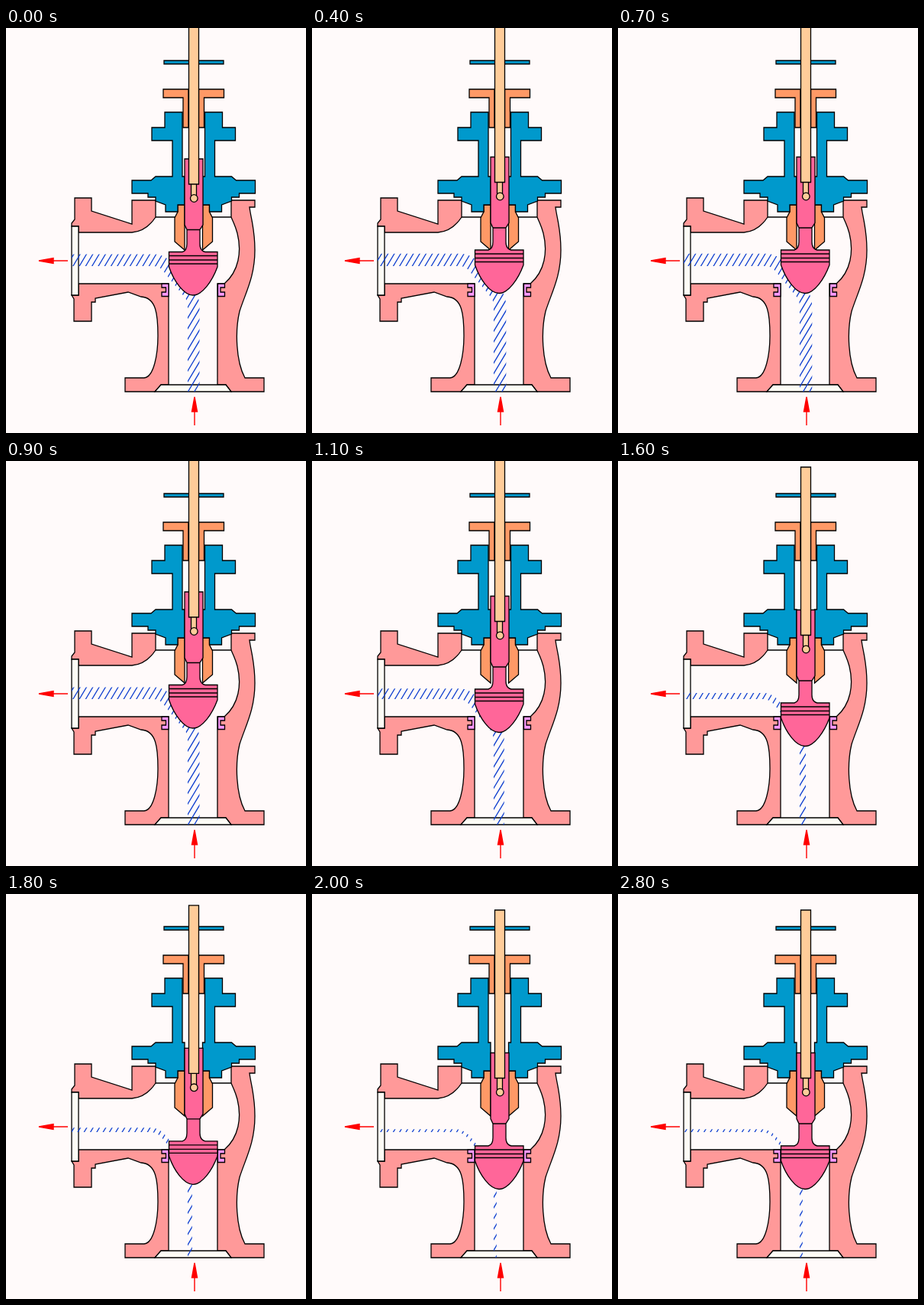
Animation, 393 px wide and 529 px high, one loop 2900 ms. Source, as an HTML page:

```html
<!DOCTYPE html>
<html lang="en">
<head>
<meta charset="utf-8">
<title>Angle valve</title>
<style>
  html, body { margin: 0; width: 100%; height: 100%; overflow: hidden; background: #fffafa; }
  svg { display: block; }
  .parts { stroke: #000; stroke-width: 1.3; }
  .pink { fill: #f99; }
  .blue { fill: #09c; }
  .orange { fill: #f96; }
  .tan { fill: #fc9; }
  .rose { fill: #f69; }
  .lilac { fill: #f9f; }
  .cream { fill: #fffdf6; }
  .red { fill: #f00; stroke: #f00; stroke-width: 1.4; }
</style>
</head>
<body>
<svg width="393" height="529" viewBox="0 0 393 529">
  <defs>
    <mask id="band" maskUnits="userSpaceOnUse" x="86" y="290" width="172" height="185">
      <path id="flow" fill="none" stroke="#fff" d="M60 311H186C200 311 205 322 213 331L232 354Q238 361 238 372V500"/>
    </mask>
    <g id="bonnet">
      <path class="orange" d="M225 231H234V290L221 279V248L225 240Z"/>
      <path class="blue" d="M208 110H231V194H234V231H225V240H209V231L196 226V221H186V216H165V199H190L196 194H218V147H191V130H208Z"/>
      <path class="orange" d="M206 80H239V130H232V91H206Z"/>
    </g>
    <path id="seat" class="lilac" d="M204 334H213V350.500H204V345H209.500V339H204Z"/>
  </defs>

  <g class="parts">
    <path class="pink" d="M90 222H112V239L165 256V225H196V247C188 259 178 266 165 267H95V259H86V255L90 250Z"/>
    <path class="pink" d="M95 334H213V466H203L195 475H156V457H181C194 456 199 425 199 402C199 375 197 352 177 351L160 345L117 353V358H112V383H89V354L86 349H95Z"/>
    <path class="pink" d="M295 225H326V234H319C321 250 326 262 326 290C326 325 314 345 306 370C300 395 301 435 313 457H338V475H295L288 466H277V334H286C305 318 309 292 303 268C300 257 297 252 295 247Z"/>
    <path class="cream" d="M86 259H95V349H86ZM203 466H288L295 475H195Z"/>
    <path d="M196 247H295"/>
    <use href="#seat"/>
    <use href="#seat" transform="translate(490.500) scale(-1 1)"/>
  </g>

  <g mask="url(#band)"><path id="hatch" stroke="#1040d0" stroke-width="1.4"/></g>

  <g class="parts">
    <use href="#bonnet"/>
    <use href="#bonnet" transform="translate(491.500) scale(-1 1)"/>
    <path class="blue" d="M207 42.500H285V47H207Z"/>
    <g id="plug">
      <path class="rose" d="M234 171H258V257L254 263.500V282Q254 291 261 292.500H277V312C270 331 257 349 245 349C233 349 220 331 213.500 312V292.500H231Q237 291 237 282V263.500L234 257Z"/>
      <path fill="none" d="M237 263.500H254M213.500 297.500H277M213.500 303H277M213.500 308H277"/>
      <path class="tan" d="M239.500 -15.500H252.500V204H239.500ZM242.500 204H249.500V219H242.500Z"/>
      <circle class="tan" cx="246.300" cy="222.500" r="4.800"/>
    </g>
  </g>

  <path class="red" d="M43 304L62 300.500V307.500ZM62 304H81"/>
  <path class="red" d="M247 482L243.500 501H250.500ZM247 501V519"/>
</svg>
<script>
  const LOOP = 2900, GAP = 8.3, SLANT = 0.6;
  const closing = [0, 2.5, 5.5, 9, 12.6, 16.2, 20, 23.5, 27, 30.3, 33.5, 36.5];
  const [plug, flow, hatch] = ["plug", "flow", "hatch"].map(id => document.getElementById(id));

  // Parallel slanted lines covering the whole flow area
  let lines = "";
  for (let i = 30; i < 70; i++) {
    const x = i * GAP + 0.5;
    lines += `M${x - 290 * SLANT} 290L${x - 480 * SLANT} 480`;
  }
  hatch.setAttribute("d", lines);

  // Steps of 100 ms, with a short pause when open and a long one when closed
  function stepAt(ms) {
    const n = Math.floor(ms / 100);
    if (n < 2) return n;
    return n < 28 ? Math.min(n - 1, 19) : 20;
  }

  function dropAt(step) {
    if (step === 0) return 0;
    return step < 8 ? -2.5 : closing[Math.min(step - 8, 11)];
  }

  function draw(now) {
    const step = stepAt(now % LOOP);
    const drop = dropAt(step);
    const width = 15.5 - 0.32 * drop;
    plug.setAttribute("transform", `translate(0 ${drop})`);
    flow.setAttribute("stroke-width", width);
    flow.setAttribute("transform", `translate(${width / 2} ${-width / 2})`);
    hatch.setAttribute("transform", `translate(${-(step % 4) * GAP / 4})`);
    requestAnimationFrame(draw);
  }
  draw(performance.now());
</script>
</body>
</html>
```
